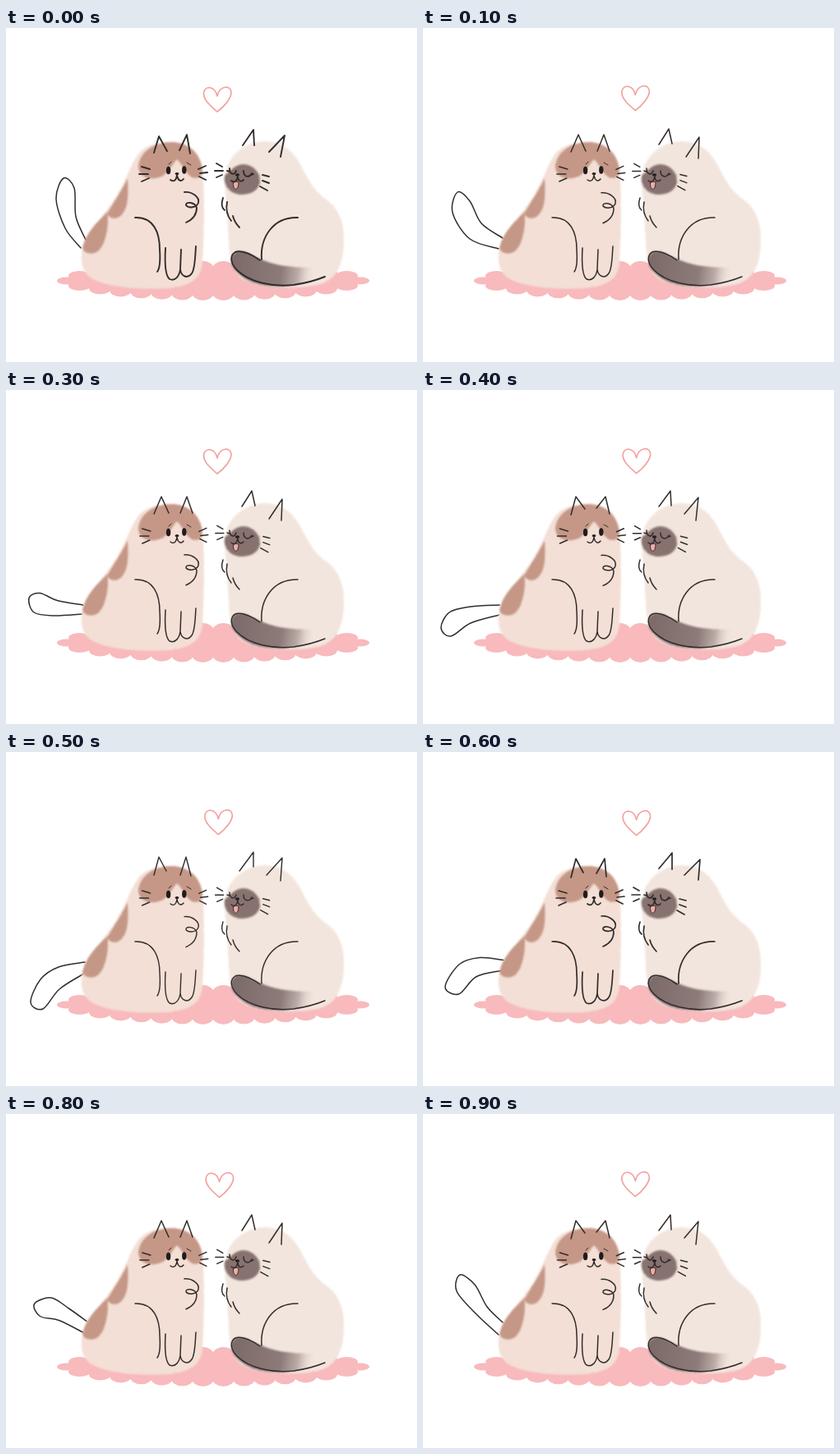
An HTML page that plays this animation: 500 px wide and 407 px high, repeating every 1 s.

```html
<!DOCTYPE html>
<html lang="en">
<head>
<meta charset="utf-8">
<title>Two cats in love</title>
<style>
  html, body { margin: 0; width: 100%; height: 100%; overflow: hidden; background: #fff; }
  svg { display: block; width: 100vw; height: 100vh; }
  .ink path { fill: none; stroke: #322c2c; stroke-linecap: round; stroke-linejoin: round; }
  .ink ellipse { fill: #211c1c; }
</style>
</head>
<body>
<svg viewBox="0 0 500 407">
  <defs>
    <filter id="rough" filterUnits="userSpaceOnUse" x="0" y="0" width="500" height="407" color-interpolation-filters="sRGB">
      <feTurbulence id="noise" type="fractalNoise" baseFrequency=".4" numOctaves="2"/>
      <feDisplacementMap in="SourceGraphic" scale="1" xChannelSelector="R" yChannelSelector="G"/>
    </filter>
    <filter id="chalk" filterUnits="userSpaceOnUse" x="0" y="0" width="500" height="407" color-interpolation-filters="sRGB">
      <feTurbulence type="fractalNoise" baseFrequency=".4" numOctaves="2" seed="4"/>
      <feDisplacementMap in="SourceGraphic" scale="2" xChannelSelector="R" yChannelSelector="G"/>
      <feGaussianBlur stdDeviation=".9"/>
    </filter>
    <linearGradient id="fade" gradientUnits="userSpaceOnUse" x1="275" y1="285" x2="376" y2="300">
      <stop offset="0" stop-color="#7c6a69"/>
      <stop offset=".6" stop-color="#8d7b7a"/>
      <stop offset=".8" stop-color="#bcaca7"/>
      <stop offset="1" stop-color="#f2e5dd" stop-opacity="0"/>
    </linearGradient>
  </defs>

  <g id="rug" fill="#f8babc"><ellipse cx="252" cy="308" rx="174" ry="18"/></g>

  <g class="ink" filter="url(#rough)"><path id="tail" stroke-width="1.5"/></g>

  <g filter="url(#chalk)">
    <path fill="#f3dfd5" d="M200 139C222 139 236 150 239 172C242 205 241 250 239 285C238 304 226 314 200 317C165 319 125 317 104 305C92 297 90 283 93 268C98 248 119 230 135 204C147 184 154 160 164 150C173 142 186 139 200 139Z"/>
    <g fill="#c59786">
      <path d="M161 168C163 150 182 139 200 139C222 139 236 152 239 172C239 182 232 185 226 182C218 177 214 165 208 160C202 166 197 179 186 182C172 186 161 180 161 168Z"/>
      <path d="M148 184C149 205 149 222 138 230C132 234 125 231 123 226C131 213 139 200 148 184Z"/>
      <path d="M123 225C126 240 121 262 114 270C108 277 95 276 93 268C97 250 109 238 123 225Z"/>
    </g>
    <path fill="#f2e5dd" d="M316 138C335 138 349 149 358 166C367 184 374 197 387 207C404 218 412 236 411 260C411 288 402 304 386 311C360 319 315 318 294 309C276 302 272 285 271 260C270 235 267 205 266 184C266 164 283 138 316 138Z"/>
    <path fill="#87726f" d="M266 180C272 176 277 167 288 166C301 166 310 177 309 188C307 198 298 203 286 203C272 202 264 192 266 180Z"/>
    <path fill="url(#fade)" d="M274 283C274 273 284 270 294 274C310 283 328 290 350 291C362 292 370 292 378 291L376 308C350 317 310 318 290 305C280 298 274 291 274 283Z"/>
  </g>

  <g id="lines" class="ink" filter="url(#rough)">
    <path id="ears"/>
    <path id="curl" d="M217 200C226 199 236 206 234 213C232 219 222 220 219 216C218 211 230 212 232 219C232 228 226 234 219 237"/>
    <path d="M157 231C180 230 187 250 187 270C188 285 187 293 184 297"/>
    <path d="M194 268C193 285 194 302 199 306C206 309 211 302 212 294L213 270M212 294C213 303 221 306 226 299C230 294 230 280 231 266"/>
    <path d="M264 207C262 213 262 219 266 222M269 212C267 222 270 230 274 235M276 229C278 237 281 240 284 243"/>
    <path d="M311 282C309 255 325 230 355 231"/>
    <path d="M309 283C299 276 288 270 279 273C272 277 273 287 281 295C296 310 325 316 350 313C364 311 376 308 388 303"/>

    <g id="whiskersL"><path d="M165 169L175 172M162 178L173 178M165 187L174 183"/></g>
    <g id="whiskersM"><path d="M234 172L243 168M236 177L245 176M235 181L243 185M256 165L263 169M254 174L264 174M256 182L263 179"/></g>
    <g id="whiskersR"><path d="M312 179L320 181M312 186L320 189M309 193L318 198"/></g>

    <ellipse cx="197.6" cy="173.5" rx="2.7" ry="4.8"/>
    <ellipse cx="216.8" cy="173" rx="2.7" ry="4.8"/>
    <ellipse cx="208" cy="177.5" rx="2.4" ry="1.6"/>
    <path d="M200 185C204 188 207 186 208 179C209 186 213 188 216 184"/>
    <path stroke-width="1" d="M198 166L201 163M220 164L225 167"/>

    <path d="M272 171C272 179 278 180 280 174M289 174C289 182 296 183 299 177M272 175L269 174M298 179L301 178"/>
    <ellipse cx="281.5" cy="179" rx="2.6" ry="1.7"/>
    <path d="M274 186C278 189 281 187 282 180C282 187 286 188 289 185"/>
    <path style="fill:#f3aaa6;stroke-width:1" d="M276.5 189C276 199 283 199 283 188C281 187 278 187 276.5 189Z"/>
  </g>

  <g filter="url(#rough)">
    <path id="heart" fill="none" stroke="#f3a3a1" stroke-width="1.7" stroke-linecap="round" stroke-linejoin="round"
      d="M257 102C250 96 240 88 240.500 79C242 70 254 70 257 83C260 70 273 69 274 78C274.500 86 264 97 257 102Z"/>
  </g>
</svg>
<script>
const STEP = 100;
const $ = id => document.getElementById(id);

// Tail outlines from upper root round the tip to lower root; gaps are the mean of their neighbours.
const tails = [
  [97,258, 85,230, 83,195, 70,183, 61,208, 72,244, 91,268],
  [97,256, 71,238, 57,211, 42,200, 36,225, 57,257, 92,269],
  [94,262, 67,249, 50,224, 34,217, 34,242, 58,266, 93,272],
  null,
  [93,262, 58,264, 32,271, 22,290, 34,300, 58,284, 93,274],
  [96,256, 64,262, 42,277, 30,305, 45,313, 65,289, 95,270],
  null,
  [99,251, 75,239, 47,240, 24,267, 42,277, 64,259, 95,263],
  null,
  [97,254, 78,235, 63,208, 45,196, 41,216, 65,244, 92,269]
];

const ears = [
  "M180 152L186 132L196 150M211 149L220 130L224 153M288 143L301 124L302 143M320 151L339 131L334 157",
  "M180 151L189 130L198 150M212 150L220 130L227 150M287 142L299 123L303 141M320 157L336 133L335 159",
  "M180 153L186 130L195 147M211 148L221 130L223 152M287 142L303 123L303 143M318 150L337 131L335 156",
  "M180 152L186 130L197 145M211 144L222 130L227 151M287 142L301 123L302 141M318 151L335 131L332 159",
  "M180 150L186 128L195 145M212 150L219 128L225 151M284 145L301 122L301 140M317 150L336 129L334 157"
];
const widths = [1.9, 1.5, 1.7, 1.5, 1.4];

const inkOrder = [0, 1, 2, 1, 3, 4, 2, 0, 1, 3];
const heartOrder = [0, 1, 2, 0, 2, 1, 2, 0, 2, 1];
const heartShift = [[0, 0], [1.3, -1.5], [2.6, -.5]];

function tailAt(i) {
  if (tails[i]) return tails[i];
  const next = tails[(i + 1) % tails.length];
  return tails[i - 1].map((v, k) => (v + next[k]) / 2);
}

// Smooth open curve through the given points.
function spline(flat) {
  const n = flat.length / 2;
  const p = (i, axis) => flat[2 * Math.max(0, Math.min(n - 1, i)) + axis];
  let d = `M${p(0, 0)} ${p(0, 1)}`;
  for (let i = 0; i < n - 1; i++) {
    const out = a => p(i, a) + (p(i + 1, a) - p(i - 1, a)) / 6;
    const into = a => p(i + 1, a) - (p(i + 2, a) - p(i, a)) / 6;
    d += `C${out(0)} ${out(1)} ${into(0)} ${into(1)} ${p(i + 1, 0)} ${p(i + 1, 1)}`;
  }
  return d;
}

function addBump(cx, cy, rx, ry) {
  const bump = document.createElementNS("http://www.w3.org/2000/svg", "ellipse");
  const shape = { cx, cy, rx, ry };
  for (const key in shape) bump.setAttribute(key, shape[key]);
  $("rug").append(bump);
}

// Scallops flatten towards the two ends of the rug.
function addScallops() {
  for (let dx = -162.5; dx <= 162.5; dx += 25) {
    const rise = Math.sqrt(1 - (dx / 180) ** 2);
    for (const side of [-1, 1]) addBump(252 + dx, 308 + side * 14 * rise, 13.5, 3 + 7 * rise);
  }
  addBump(74, 308, 12, 4.5);
  addBump(430, 308, 12, 4.5);
}

let shown = -1;
function draw(time) {
  const step = Math.floor(time / STEP) % tails.length;
  if (step === shown) return;
  shown = step;
  const ink = inkOrder[step];
  const side = [0, .8, 0, 1.4, .6][ink];
  const move = (id, x, y) => $(id).setAttribute("transform", `translate(${x} ${y})`);
  $("tail").setAttribute("d", spline(tailAt(step)));
  $("ears").setAttribute("d", ears[ink]);
  $("lines").setAttribute("stroke-width", widths[ink]);
  $("noise").setAttribute("seed", ink * 7 + 2);
  move("curl", 0, side);
  move("whiskersL", side, 0);
  move("whiskersM", side, side / 2);
  move("whiskersR", side, -side / 2);
  move("heart", ...heartShift[heartOrder[step]]);
}

function loop() {
  draw(performance.now());
  requestAnimationFrame(loop);
}

addScallops();
loop();
</script>
</body>
</html>
```
